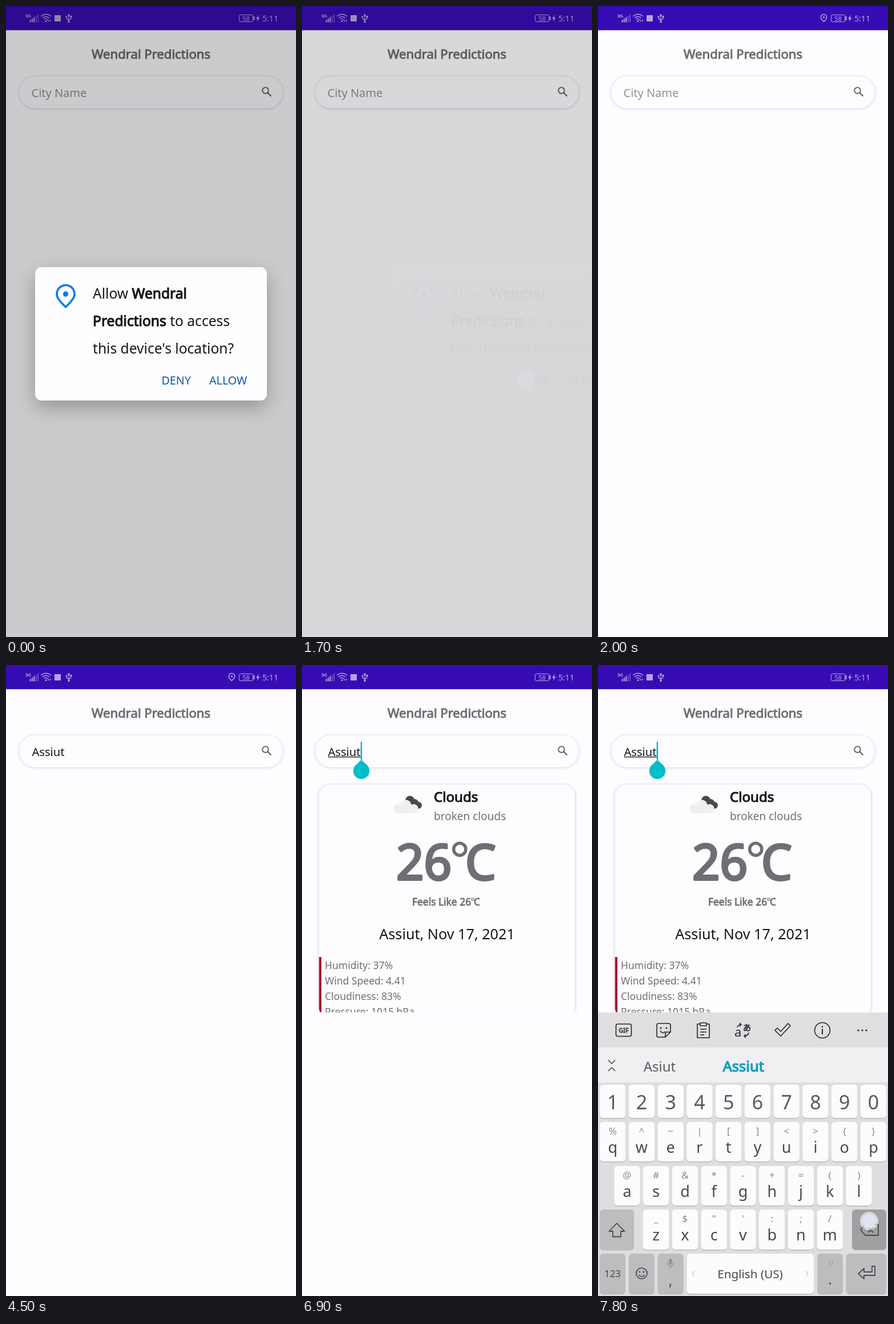
An HTML page with a canvas that plays this animation: 508x1102 px, repeating every 8 s.

```html
<!DOCTYPE html>
<html lang="en">
<head>
<meta charset="utf-8">
<title>Weather search</title>
<style>
html, body { margin: 0; width: 508px; height: 1102px; overflow: hidden; background: #fefcff; }
canvas { display: block; }
</style>
</head>
<body>
<canvas id="stage" width="508" height="1102"></canvas>
<script>
const ctx = document.getElementById('stage').getContext('2d');
const W = 508, H = 1102, LOOP = 8000, STEP = 100;
const PAGE = '#fefcff', GREY = '#706e72', INK = '#17161a', TEAL = '#00bfc8', KEY_INK = '#4a484c';
const APP = ['Wendral', 'Predictions'];
const clamp = v => Math.max(0, Math.min(1, v));

function text(str, x, y, size, color, { bold = false, align = 'left' } = {}) {
  ctx.font = `${size}px "Noto Sans", "Noto Sans CJK JP", sans-serif`;
  ctx.textAlign = align;
  ctx.fillStyle = ctx.strokeStyle = color;
  ctx.fillText(str, x, y);
  if (bold) {
    ctx.lineWidth = size * 0.046;
    ctx.lineJoin = 'round';
    ctx.strokeText(str, x, y);
  }
  return x + ctx.measureText(str).width;
}
const centered = (str, x, y, size, color, bold) => text(str, x, y, size, color, { bold, align: 'center' });

function box(x, y, w, h, r, fill, line) {
  ctx.beginPath();
  ctx.roundRect(x, y, w, h, r);
  if (fill) { ctx.fillStyle = fill; ctx.fill(); }
  if (line) { ctx.strokeStyle = line; ctx.lineWidth = 1; ctx.stroke(); }
}

function shadowed(color, blur, dy, draw) {
  ctx.save();
  ctx.shadowColor = color;
  ctx.shadowBlur = blur;
  ctx.shadowOffsetY = dy;
  draw();
  ctx.restore();
}

function dot(x, y, r, color) {
  ctx.fillStyle = color;
  ctx.beginPath();
  ctx.arc(x, y, r, 0, 7);
  ctx.fill();
}

function line(d, color, width = 1.6) {
  ctx.strokeStyle = color;
  ctx.lineWidth = width;
  ctx.lineJoin = 'round';
  ctx.stroke(new Path2D(d));
}

function shape(d, color) {
  ctx.fillStyle = color;
  ctx.fill(new Path2D(d));
}

function ring(x, y, r, color, width) {
  ctx.strokeStyle = color;
  ctx.lineWidth = width;
  ctx.beginPath();
  ctx.arc(x, y, r, 0, 7);
  ctx.stroke();
}

function pin(x, y, r, color, width) {
  const a = 0.35, sx = r * Math.cos(a), sy = r * Math.sin(a);
  ctx.strokeStyle = color;
  ctx.lineWidth = width;
  ctx.lineJoin = 'round';
  ctx.beginPath();
  ctx.arc(x, y, r, Math.PI - a, a);
  ctx.lineTo(x + sx, y + sy);
  ctx.quadraticCurveTo(x + r * 0.65, y + r * 0.85, x, y + r * 1.47);
  ctx.quadraticCurveTo(x - r * 0.65, y + r * 0.85, x - sx, y + sy);
  ctx.closePath();
  ctx.stroke();
  dot(x, y, r * 0.3, color);
}

function touch(x, y, alpha) {
  ctx.save();
  ctx.globalAlpha = alpha;
  dot(x, y, 16, 'rgba(255,255,255,.6)');
  dot(x, y, 12, 'rgba(226,232,246,.85)');
  ctx.restore();
}

function celsius(str, x, y, size, color) {
  const end = text(str, x, y, size, color, { bold: true });
  ring(end + size * 0.165, y - size * 0.62, size * 0.125, color, size * 0.065);
  text('C', end + size * 0.28, y, size, color, { bold: true });
}

function statusBar(hasPin) {
  const c = '#b5a6e4', dim = '#6a4cc8';
  ctx.fillStyle = '#380cb4';
  ctx.fillRect(0, 0, W, 42.3);
  text('3G', 34, 20, 7.5, c, { bold: true });
  [4, 6.5, 9, 11.5, 14].forEach((h, i) => {
    ctx.fillStyle = i < 3 ? c : dim;
    ctx.fillRect(41.5 + i * 3.4, 28.5 - h, 2, h);
  });
  for (const r of [4, 8, 12]) {
    ctx.strokeStyle = c;
    ctx.lineWidth = 1.5;
    ctx.beginPath();
    ctx.arc(70, 26.5, r, -2.36, -0.78);
    ctx.stroke();
  }
  dot(70, 26.5, 1.5, c);
  shape('M73 25.5l2 -2.5v5zM79 25.5l-2 -2.5v5z', c);
  box(85, 16, 11, 11, 1, c);
  line('M110 16V27M106 19V22L110 25L114 22V18', c, 1.3);
  shape('M110 13.5l2.5 4h-5z', c);
  dot(110, 27.5, 1.8, c);
  dot(106, 19, 1.4, c);
  box(112.5, 17, 3, 3, 0, c);
  if (hasPin) pin(395.5, 19.8, 5.2, c, 1.5);
  box(408.5, 15.5, 24, 12, 2, null, c);
  centered('58', 420.5, 25.6, 11, c);
  box(433.5, 18, 2, 7, 0, c);
  shape('M442.5 15.5L438 22.5H441L440 27.5L444.5 20.5H441.5z', c);
  text('5:11', 449, 27, 14.1, c);
}

function searchField(typed, editing, caret) {
  centered(APP.join(' '), 254, 92, 22.1, GREY, true);
  shadowed('rgba(60,50,90,.18)', 4, 1, () => box(22.5, 122, 463, 57, 28.5, PAGE));
  box(22.5, 122, 463, 57, 28.5, PAGE, '#e6e4ec');
  if (typed) text('Assiut', 45.5, 159, 20.1, INK);
  else text('City Name', 44.5, 159, 20, '#929094');
  ring(454.5, 147.5, 5.3, '#69676b', 2);
  line('M458.3 151.3L464.5 157.5', '#69676b', 2.4);
  if (editing) {
    ctx.fillStyle = INK;
    ctx.fillRect(45.5, 160, 57.5, 1.3);
    ctx.fillStyle = TEAL;
    if (caret) ctx.fillRect(102.7, 134, 2.5, 32);
    dot(104, 185, 14.2, TEAL);
    shape('M104 165.5L115 176V186H93V176z', TEAL);
  }
}

function clouds(alpha) {
  ctx.save();
  ctx.globalAlpha = alpha;
  [[189, 236.5, 8], [197, 241, 7], [204, 245, 6]].forEach(([x, y, r]) => dot(x, y, r, '#4a494c'));
  [[182, 245, 9.5], [169, 251, 8], [195.5, 251, 8]].forEach(([x, y, r]) => dot(x, y, r, '#f0eef1'));
  box(169, 245, 27, 14, 2, '#f0eef1');
  ctx.restore();
}

function weatherCard(iconAlpha) {
  shadowed('rgba(60,50,90,.25)', 5, 1.5, () => box(29.5, 208, 449, 409, 20, PAGE));
  box(29.5, 208, 449, 409, 20, PAGE, '#e8e6ed');
  ctx.save();
  ctx.clip();
  ctx.fillStyle = '#a3132c';
  ctx.fillRect(29.7, 510, 4.3, 98);
  ctx.restore();
  clouds(iconAlpha);
  text('Clouds', 231, 239, 24.1, INK, { bold: true });
  text('broken clouds', 231, 271, 19, GREY);
  celsius('26', 165, 374.5, 85, GREY);
  celsius('Feels Like 26', 193, 420, 17.4, GREY);
  centered('Assiut, Nov 17, 2021', 254, 479, 25.2, INK);
  ['Humidity: 37%', 'Wind Speed: 4.41', 'Cloudiness: 83%', 'Pressure: 1015 hPa']
    .forEach((row, i) => text(row, 40, 531 + i * 26.9, 17.5, GREY));
}

function dialog(leave) {
  ctx.save();
  ctx.globalAlpha = 1 - 0.975 * leave;
  ctx.translate(109 * leave, 0);
  shadowed('rgba(0,0,0,.27)', 34, 12, () => box(51, 456, 406, 233, 11, '#fefdff'));
  pin(104.5, 503, 15.5, '#0a7cec', 3.6);
  const size = 24.6;
  const x = text('Allow ', 152, 511, size, INK);
  text(APP[0], x, 511, size, INK, { bold: true });
  const end = text(APP[1], 152, 559, size, INK, { bold: true });
  text(' to access', end, 559, size, INK);
  text("this device's location?", 152, 607, size, INK);
  text('DENY', 272.5, 660.5, 19.7, '#0a58a4');
  text('ALLOW', 356, 660.5, 19.7, '#0a58a4');
  ctx.restore();
}

function key(x, y, w, h, fill = '#fdfbfe') {
  box(x, y + 1.5, w, h, 6, '#bcbabd');
  box(x, y, w, h, 6, fill);
}

function keyRow(chars, hints, x0, y, h) {
  [...chars].forEach((ch, i) => {
    const x = x0 + i * 50.75, cx = x + 22.7;
    key(x, y, 45.4, h);
    if (hints) {
      centered(hints[i], cx, y + 22, 17, '#8a888c');
      centered(ch, cx, y + 54, 27, KEY_INK);
    } else centered(ch, cx, y + 43, 34, '#5a585c');
  });
}

function toolbar() {
  const c = '#242326';
  ctx.fillStyle = '#e0dee1';
  ctx.fillRect(0, 607, W, 61);
  ctx.fillStyle = '#f1eff2';
  ctx.fillRect(0, 668, W, 61);
  line('M35 627H55Q58.5 627 58.5 630.5V645Q58.5 648.5 55 648.5H35Q31.5 648.5 31.5 645V630.5Q31.5 627 35 627z', c);
  centered('GIF', 45, 642, 11, c, true);
  line('M106 626H124Q127 626 127 629V641L118 650H106Q103 650 103 647V629Q103 626 106 626zM127 641H121Q118 641 118 644V650M109 639Q113 645 118 640', c);
  dot(110, 634, 1.5, c);
  dot(120, 634, 1.5, c);
  line('M179 627H174V651H195V627H190M179 625H190V630H179zM179 636H190M179 641H190M179 646H186', c);
  text('a', 239, 649, 22, c);
  text('あ', 254, 638, 14, c, { bold: true });
  line('M244 633Q245 628 251 628M248 625L251 628L248 631M264 642Q263 648 256 648M259 645L256 648L259 651', c);
  line('M310 638L314 634L320 640L333 626L337 630L320 648z', c);
  ring(393, 638, 13.5, c, 1.6);
  line('M393 635.5V645M393 630.5V633', c, 2);
  [456, 463, 470].forEach(x => dot(x, 638, 1.6, c));
  line('M18 690L24 696L30 690M18 709L24 703L30 709', KEY_INK);
  centered('Asiut', 108, 710, 24, '#5c5a5e');
  text('Assiut', 218.5, 710, 25.6, '#0a9bbf', { bold: true });
}

function keyboard(pressed) {
  const mod = '#bebcbf', light = '#929094';
  toolbar();
  ctx.fillStyle = '#dfdde0';
  ctx.fillRect(0, 729, W, 373);
  keyRow('1234567890', null, 3, 733, 58);
  keyRow('qwertyuiop', '%^~|[]<>{}', 3, 798, 69);
  keyRow('asdfghjkl', '@#&*-+=()', 28.3, 875, 69);
  keyRow('zxcvbnm', '_$"\':;/', 79, 951, 70);

  key(3, 951, 60, 70, mod);
  line('M33 975L46.5 989H40V998.5H26V989H19.5z', KEY_INK, 1.8);
  key(445, 951, 60, 70, pressed ? '#a19fa2' : mod);
  line('M460 986L468 977H491V996H468zM473 982L482 991M482 982L473 991', KEY_INK, 1.8);

  key(3, 1028, 45, 70, mod);
  centered('123', 25.5, 1069, 17, KEY_INK);
  key(54, 1028, 45, 70, mod);
  ring(76.5, 1062.5, 9.5, KEY_INK, 1.7);
  line('M71.5 1065Q76.5 1071.5 81.5 1065', KEY_INK);
  dot(73, 1060, 1.4, KEY_INK);
  dot(80, 1060, 1.4, KEY_INK);
  key(104.5, 1028, 45, 70, mod);
  box(124.5, 1037, 5, 10, 2.5, light);
  line('M122 1043Q122 1049.5 127 1049.5T132 1043M127 1050V1054', light, 1.4);
  centered(',', 127, 1084, 25, KEY_INK);
  key(155.5, 1028, 222.5, 70);
  centered('English (US)', 266.5, 1071, 20.7, KEY_INK);
  line('M169 1058L165 1063L169 1068M364 1058L368 1063L364 1068', '#cfcdd0', 1.5);
  key(384, 1028, 45, 70, mod);
  centered(',!?', 406.5, 1050, 13, light);
  centered('.', 406.5, 1082, 25, KEY_INK);
  key(434.5, 1028, 70.5, 70, mod);
  line('M456 1063L466 1054V1060H480V1050H485V1066H466V1072z', KEY_INK, 1.8);
}

function draw(t) {
  const editing = t >= 6600;
  const caret = t < 7300 || t >= 7800;
  ctx.fillStyle = PAGE;
  ctx.fillRect(0, 0, W, H);
  statusBar(t >= 1800 && t < 4900);
  searchField(t >= 4500, editing, caret);

  if (t >= 5100) weatherCard(clamp((t - 5000) / 400));
  if (t >= 6900) {
    ctx.fillStyle = PAGE;
    ctx.fillRect(0, 606.5, W, H);
  }

  if (t < 1800) {
    const leave = clamp((t - 1500) / 200);
    ctx.fillStyle = `rgba(0,0,0,${0.2 - 0.05 * leave})`;
    ctx.fillRect(0, 0, W, H);
    dialog(leave);
    if (t >= 1400) touch(392, 652, 0.9 - 0.72 * leave);
  }

  if (t >= 7100) {
    const left = 1 - clamp((t - 7000) / 300);
    ctx.save();
    ctx.translate(0, 495 * left * left);
    keyboard(t >= 7800);
    ctx.restore();
  }
  if (t >= 7800) touch(475, 971, 1);
}

function frame() {
  const t = performance.now() % LOOP;
  draw(Math.floor(t / STEP) * STEP);
  requestAnimationFrame(frame);
}
frame();
</script>
</body>
</html>
```
